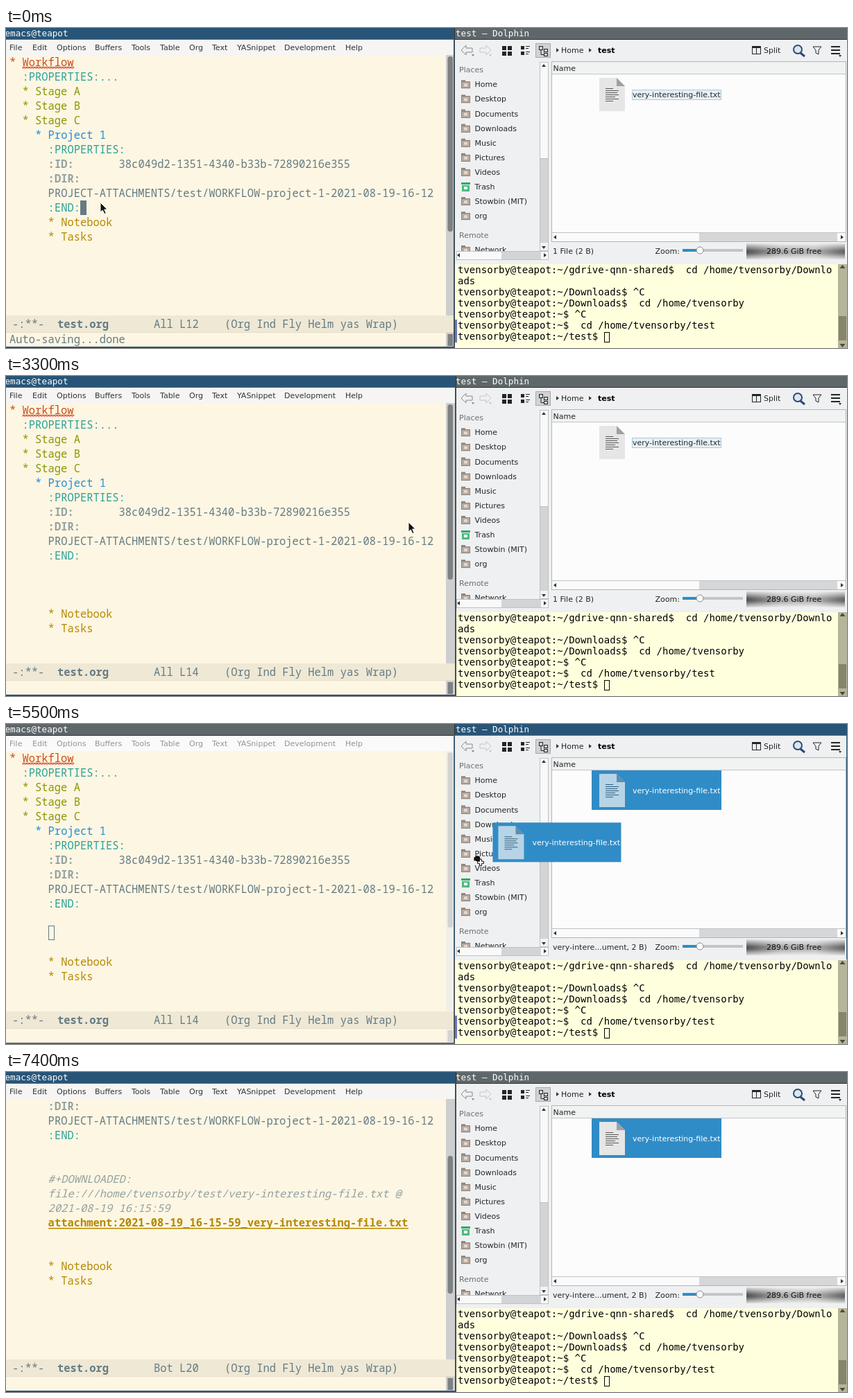
An HTML page with a canvas that plays this animation: 1212x462 px, repeating every 8 s.

```html
<!DOCTYPE html>
<html lang="en">
<head>
<meta charset="utf-8">
<title>Drag a file into an outline</title>
<style>
html, body { margin: 0; width: 100%; height: 100%; overflow: hidden; background: #fdf6e3; }
canvas { display: block; }
</style>
</head>
<body>
<canvas id="stage" width="1212" height="462"></canvas>
<script>
const g = document.getElementById('stage').getContext('2d');
const LOOP = 8000, CELL = 9.27, LINE = 21;
const CODE = '15.45px "Noto Sans Mono", monospace';
const TERM = '14px "DejaVu Sans Mono", monospace';
const TITLE = '12.6px "DejaVu Sans Mono", monospace';
const UI = '11px "DejaVu Sans", sans-serif';
const USER = 'tvensorby', HOST = 'teapot', FILE = 'very-interesting-file.txt';
const INK = '#657b83', PALE = '#93a1a1', CYAN = '#2aa198', GREEN = '#859900', GOLD = '#b58900';

function rect(color, x, y, w, h) {
  g.fillStyle = color;
  g.fillRect(x, y, w, h);
}
function frame(color, x, y, w, h) {
  g.strokeStyle = color;
  g.lineWidth = 1;
  g.strokeRect(x + .5, y + .5, w - 1, h - 1);
}
function text(s, x, y, color = '#232627', font = UI) {
  g.font = font;
  g.fillStyle = color;
  g.fillText(s, x, y);
}
function poly(points, fill, stroke, width = 1) {
  g.beginPath();
  for (let i = 0; i < points.length; i += 2) g.lineTo(points[i], points[i + 1]);
  if (fill) { g.closePath(); g.fillStyle = fill; g.fill(); }
  if (stroke) { g.strokeStyle = stroke; g.lineWidth = width; g.stroke(); }
}
function disc(x, y, r, fill, stroke, width = 1) {
  g.beginPath();
  g.arc(x, y, r, 0, 7);
  if (fill) { g.fillStyle = fill; g.fill(); }
  if (stroke) { g.strokeStyle = stroke; g.lineWidth = width; g.stroke(); }
}
// small triangle pointing up, down, left or right
function arrow(x, y, dx, dy, color = '#333', r = 3) {
  poly([x + dx * r, y + dy * r, x - dx - dy * r, y - dy - dx * r, x - dx + dy * r, y - dy + dx * r], color);
}
const code = (s, col, row, color, style = '') =>
  text(s, 5 + col * CELL, 55 + row * LINE, color, style + CODE);

// Everything that depends on time
function stateAt(t) {
  const s = {
    narrow: t < 300 || t >= 5100 && t < 6800,
    breaks: t < 1100 ? 0 : t < 1400 ? 1 : t < 3300 ? 2 : 3,
    line: t < 1100 ? 12 : t < 1400 ? 13 : t < 2300 ? 14 : t < 3300 ? 13 : 14,
    blinkOn: t < 1000 || t >= 1100 && t < 1900 || t >= 2300 && t < 3300 || t >= 6900 && t < 7400,
    echo: t < 300 ? 'Auto-saving...done' : '',
    dropped: t >= 6900,
    selected: t >= 5100,
    dragging: t >= 5400 && t < 6800,
    mouse: null
  };
  if (t < 3300) s.mouse = [136, 252];
  else if (t < 5400) {
    const k = Math.max(0, Math.min(6, Math.floor((t - 3400) / 100))) / 6;
    s.mouse = [580 + 297 * k, 211 - 101 * k];
  } else if (t < 6800) {
    const k = .43 + .57 * Math.min(5, Math.floor((t - 5400) / 100)) / 5;
    s.mouse = [877 - 365 * k, 110 + 155 * k];
    s.ghost = [s.mouse[0] + 23, s.mouse[1] - 52];
    if (s.mouse[0] < 640) s.echo = '5 1';
    if (t >= 6100) s.mouse[1] += 31;
  }
  s.focus = t < 3600 || t >= 6800;
  s.hover = t >= 4000 && t < 5400;
  return s;
}

function outline(s) {
  if (s.dropped) {
    code(':DIR:', 6, 0, PALE, 'bold ');
    code('PROJECT-ATTACHMENTS/test/WORKFLOW-project-1-2021-08-19-16-12', 6, 1, INK);
    code(':END:', 6, 2, CYAN);
    code('#+DOWNLOADED:', 6, 5, PALE, 'italic ');
    code(`file:///home/${USER}/test/${FILE} @`, 6, 6, PALE, 'italic ');
    code('2021-08-19 16:15:59', 6, 7, PALE, 'italic ');
    code('attachment:2021-08-19_16-15-59_' + FILE, 6, 8, GOLD, 'bold ');
    rect(GOLD, 61, 225, 519, 1.5);
    code('* Notebook', 6, 11, GOLD);
    code('* Tasks', 6, 12, GOLD);
    return;
  }
  code('* Workflow', 0, 0, '#cb4b16');
  rect('#cb4b16', 23.5, 56, 75, 1);
  const wave = [];
  for (let x = 23.5; x < 98; x += 2) wave.push(x, x % 4 < 2 ? 57 : 59);
  poly(wave, null, '#dc322f');
  code(':PROPERTIES:...', 2, 1, CYAN);
  ['A', 'B', 'C'].forEach((c, i) => code('* Stage ' + c, 2, 2 + i, GREEN));
  code('* Project 1', 4, 5, '#268bd2');
  code(':PROPERTIES:', 6, 6, CYAN);
  code(':ID:', 6, 7, PALE, 'bold ');
  code('38c049d2-1351-4340-b33b-72890216e355', 17, 7, INK);
  code(':DIR:', 6, 8, PALE, 'bold ');
  code('PROJECT-ATTACHMENTS/test/WORKFLOW-project-1-2021-08-19-16-12', 6, 9, INK);
  code(':END:', 6, 10, CYAN);
  code('* Notebook', 6, 11 + s.breaks, GOLD);
  code('* Tasks', 6, 12 + s.breaks, GOLD);
}

function editor(s) {
  const edge = s.narrow ? 646 : 648;
  const bar = s.focus ? '#285577' : '#5f676a';
  rect('#fdf6e3', 0, 39, edge, 423);
  rect(bar, 0, 0, edge, 16);
  rect(s.focus ? '#4c7899' : '#333', 0, 16, edge, 1);
  text('emacs@' + HOST, -1.5, 12, '#fff', TITLE);
  rect(s.focus ? '#f6f5f4' : '#fafafa', 0, 17, edge, 22);
  const menu = { File: 5, Edit: 38, Options: 73, Buffers: 128, Tools: 181, Table: 222, Org: 264,
    Text: 297, YASnippet: 333, Development: 401, Help: 489 };
  for (const name in menu) text(name, menu[name], 32, s.focus ? '#2e3436' : '#929595');

  outline(s);
  const row = s.dropped ? 12 : s.line - 2;
  const x = s.dropped ? 126 : row == 10 ? 107 : 61, y = 39 + row * LINE;
  if (!s.focus) frame(INK, x, y, 9, LINE);
  else if (s.blinkOn) rect(INK, x, y, 9, LINE);

  const track = s.focus ? '#cecece' : '#f1efe9', thumb = s.focus ? '#7e8182' : '#d3d3d1';
  rect(track, 634, 39, edge - 634, 376);
  g.fillStyle = thumb;
  g.beginPath();
  g.roundRect(636.5, s.dropped ? 121 : 41, 7.5, s.dropped ? 199 : 253, 4);
  g.fill();
  rect('#eee8d5', 0, 415, edge, 25);
  rect('#e2dcc8', 0, 439, edge, 1);
  const mode = (str, col, style = '') => text(str, 9 + col * CELL, 433, INK, style + CODE);
  mode('-:**-', 0);
  mode('test.org', 7, 'bold ');
  mode(s.dropped ? 'Bot L20' : 'All L' + s.line, 22);
  mode('(Org Ind Fly Helm yas Wrap)', 33);
  rect(track, 634, 440, edge - 634, 20);
  rect(thumb, 636.5, 442, 7.5, 17);
  text(s.echo, 5, 455, INK, CODE);
  rect(bar, 0, 460, edge, 2);
  rect(bar, edge - 1, 16, 1, 446);
}

function fileItem(x, y, s, ghost) {
  const blue = s.selected, tint = blue && !s.focus;
  if (blue) rect('#308cc6', x + (ghost ? 2 : 0), y, ghost ? 185 : 187, 57);
  else {
    rect('#e8f1f6', x + 58, y + 22, 129, 15);
    frame('#a9c9da', x + 58, y + 22, 129, 15);
  }
  g.save();
  if (!blue && s.hover) g.globalAlpha = .5;
  const ix = x + (ghost ? 10 : 11), iy = y + 5;
  poly([ix, iy, ix + 25, iy, ix + 37, iy + 12, ix + 37, iy + 48, ix, iy + 48],
    tint ? s.hover ? '#d3e5ef' : '#b7d4e6' : '#e6e6e6');
  poly([ix + 25, iy, ix + 37, iy + 12, ix + 25, iy + 12],
    tint ? s.hover ? '#8fb9d4' : '#5b8eb0' : '#a0a0a0');
  [11, 19, 17, 19, 14, 19, 11].forEach((w, i) =>
    rect(tint ? s.hover ? '#4c8eb8' : '#2f5f80' : '#555', ix + 9, iy + 15 + i * 3, w, 1));
  g.restore();
  text(FILE, x + 59, y + 33, blue ? '#fff' : '#232627');
  if (s.hover && !ghost) {
    rect('#999', x + 2, y + 1, 18, 18);
    frame('#848484', x + 2, y + 1, 18, 18);
    rect('#fff', x + 5, y + 9, 12, 2);
    if (!blue) rect('#fff', x + 10, y + 4, 2, 12);
  }
}

function toolbar() {
  for (const [x, d, c] of [[665, -1, '#85888a'], [690, 1, '#c3c5c6']]) {
    poly([x + d * 9, 32, x + d * 2, 25, x + d * 2, 29, x - d * 7, 29, x - d * 7, 35,
      x + d * 2, 35, x + d * 2, 39, x + d * 9, 32], null, c);
    arrow(x + 8, 39, 0, 1, c, 2);
  }
  for (const y of [26, 34]) {
    rect('#232627', 715, y, 6, 6);
    rect('#232627', 723, y, 6, 6);
    rect('#232627', 742, y, 5, 5);
    rect('#232627', 749, y, 6, 1);
    rect('#232627', 749, y + 3, 4, 1);
  }
  rect('#d0d2d3', 763, 22, 22, 21);
  frame('#a6a8aa', 763, 22, 22, 21);
  frame('#232627', 768, 26, 6, 6);
  frame('#232627', 775, 30, 6, 5);
  frame('#232627', 775, 36, 6, 5);
  poly([771, 32, 771, 38.5, 775, 38.5], null, '#232627');
  arrow(794, 32, 1, 0);
  text('Home', 800, 36);
  arrow(841, 32, 1, 0);
  text('test', 853, 36, '#000', 'bold ' + UI);
  frame('#232627', 1075, 26, 13, 12);
  rect('#232627', 1075, 26, 13, 3);
  rect('#232627', 1081, 26, 1, 12);
  text('Split', 1092, 36);
  disc(1141, 31, 6, '#dce6ee', '#2c4a78', 2);
  poly([1145, 36, 1151, 41], null, '#2c4a78', 3);
  poly([1163, 27, 1175, 27, 1171, 32, 1171, 38, 1167, 36, 1167, 32, 1163, 27], null, '#232627');
  for (const y of [26, 31, 36]) rect('#232627', 1189, y, 13, 2);
  arrow(1202, 40, 0, 1, '#232627', 2);
}

function places() {
  text('Places', 653, 64, '#6d7072');
  ['Home', 'Desktop', 'Documents', 'Downloads', 'Music', 'Pictures', 'Videos', 'Trash', 'Stowbin (MIT)', 'org', '', 'Network']
    .forEach((name, i) => {
      const y = i == 11 ? 320 : 81.3 + i * 21.1;
      if (!name) return;
      g.save();
      g.beginPath();
      g.rect(649, 49, 120, 273);
      g.clip();
      if (name == 'Trash') {
        rect('#27ae60', 656, y - 6, 13, 3);
        rect('#4dbb7e', 657, y - 2, 11, 9);
        rect('#fff', 660, y, 5, 4);
      } else {
        rect('#8d8178', 656, y - 6, 6, 3);
        rect('#b8aaa0', 656, y - 4, 13, 10);
        frame('#8d8178', 656, Math.round(y - 4), 13, 10);
        rect('#e2d9d2', 660, y - 1, 5, 4);
      }
      text(name, 675.5, y + 4);
      g.restore();
    });
  text('Remote', 653, 303, '#6d7072');
  rect('#d3d4d5', 769, 49, 13, 273);
  rect('#f9f9f9', 769, 49, 13, 139);
  frame('#bfc1c2', 769, 49, 13, 273);
  rect('#bfc1c2', 769, 188, 13, 1);
  rect('#f4f4f4', 770, 310, 11, 11);
  arrow(775, 55, 0, -1);
  arrow(775, 316, 0, 1);
  rect('#f9f9f9', 649, 322, 133, 13);
  rect('#d3d4d5', 714, 323, 57, 11);
  frame('#bfc1c2', 649, 322, 133, 13);
  arrow(653, 328, -1, 0);
  arrow(776, 328, 1, 0);
}

function fileManager(s) {
  const left = s.narrow ? 647 : 649;
  const bar = s.focus ? '#5f676a' : '#285577';
  rect('#eff0f1', left, 0, 1212 - left, 341);
  rect(bar, left, 0, 1212 - left, 16);
  rect(s.focus ? '#333' : '#4c7899', left, 16, 1212 - left, 1);
  text('test — Dolphin', 648, 12, '#fff', TITLE);
  toolbar();
  places();
  rect('#fcfcfc', 786, 49, 425, 260);
  rect('#f1f2f2', 787, 49, 424, 17);
  rect('#c4c6c7', 787, 66, 424, 1);
  text('Name', 788.5, 62);
  rect('#d6d7d8', 787, 296, 424, 12);
  rect('#fafafa', 787, 296, 212, 12);
  rect('#fafafa', 1198, 296, 13, 12);
  frame('#bfc1c2', 786, 295, 425, 14);
  frame('#b3b5b6', 786, 48, 425, 261);
  arrow(792, 302, -1, 0);
  arrow(1204, 302, 1, 0);
  fileItem(844, 67, s);

  const visited = !s.focus && (s.hover || s.selected) || s.selected;
  text(visited ? 'very-intere...ument, 2 B)' : '1 File (2 B)', 788, 326);
  text('Zoom:', 935.5, 326);
  rect('#c2c4c5', 975, 319, 87, 4);
  rect('#308cc6', 975, 319, 22, 4);
  disc(1000, 321, 5, '#fcfcfc', '#8b8d8f');
  const across = g.createLinearGradient(1067, 0, 1208, 0);
  [[0, '#555'], [.35, '#aaa'], [.7, '#b4b4b4'], [1, '#666']].forEach(c => across.addColorStop(...c));
  rect(across, 1067, 311, 142, 23);
  const down = g.createLinearGradient(0, 311, 0, 334);
  [[0, '#fffc'], [.45, '#fff0'], [.6, '#fff0'], [1, '#fffc']].forEach(c => down.addColorStop(...c));
  rect(down, 1067, 311, 142, 23);
  text('289.6 GiB free', 1096, 326, '#111');
  if (!s.focus) rect(bar, 1211, 16, 1, 324);
  rect(s.focus ? '#484e50' : bar, left - 1, 16, 1, 324);
}

function terminal(s) {
  const left = s.narrow ? 647 : 649;
  rect('#ffffdd', left, 341, 553, 121);
  rect('#484e50', left - 1, 340, 1, 122);
  if (s.narrow) rect('#6c78b5', 647, 421, 3, 33);
  const at = `${USER}@${HOST}:`;
  [at + `~/gdrive-qnn-shared$  cd /home/${USER}/Downlo`, 'ads', at + '~/Downloads$ ^C',
    at + `~/Downloads$  cd /home/${USER}`, at + '~$ ^C', at + `~$  cd /home/${USER}/test`, at + '~/test$ ']
    .forEach((str, i) => text(str, 651, 354 + i * 16, '#000', TERM));
  frame('#000', 862, 439, 8, 15);
  rect('#b5b59c', 1199, 341, 13, 121);
  rect('#85856c', 1200, 416, 11, 35);
  arrow(1205.5, 346, 0, -1, '#4a4a3c', 4);
  arrow(1205.5, 457, 0, 1, '#4a4a3c', 4);
}

function pointer([x, y], dragging) {
  g.save();
  g.translate(x, y);
  if (dragging) {
    disc(1, 0, 4, '#111');
    rect('#111', -4, -2, 8, 5);
    poly([4, 1, 7, 1, 7, 4, 10, 4, 10, 7, 7, 7, 7, 10, 4, 10, 4, 7, 1, 7, 1, 4, 4, 4, 4, 1], '#fff', '#111');
  } else {
    poly([0, 0, 0, 14, 3.2, 11, 5.8, 16.5, 8.2, 15.4, 5.7, 10, 10, 10, 0, 0], '#111', '#fff');
  }
  g.restore();
}

function draw(now) {
  const s = stateAt(now % LOOP);
  rect('#333', 0, 0, 1212, 462);
  fileManager(s);
  terminal(s);
  editor(s);
  if (s.ghost) fileItem(s.ghost[0] - 2, s.ghost[1], s, true);
  if (s.mouse) pointer(s.mouse, s.dragging);
}

const start = performance.now();
function tick() {
  draw(performance.now() - start);
  requestAnimationFrame(tick);
}
tick();
</script>
</body>
</html>
```
